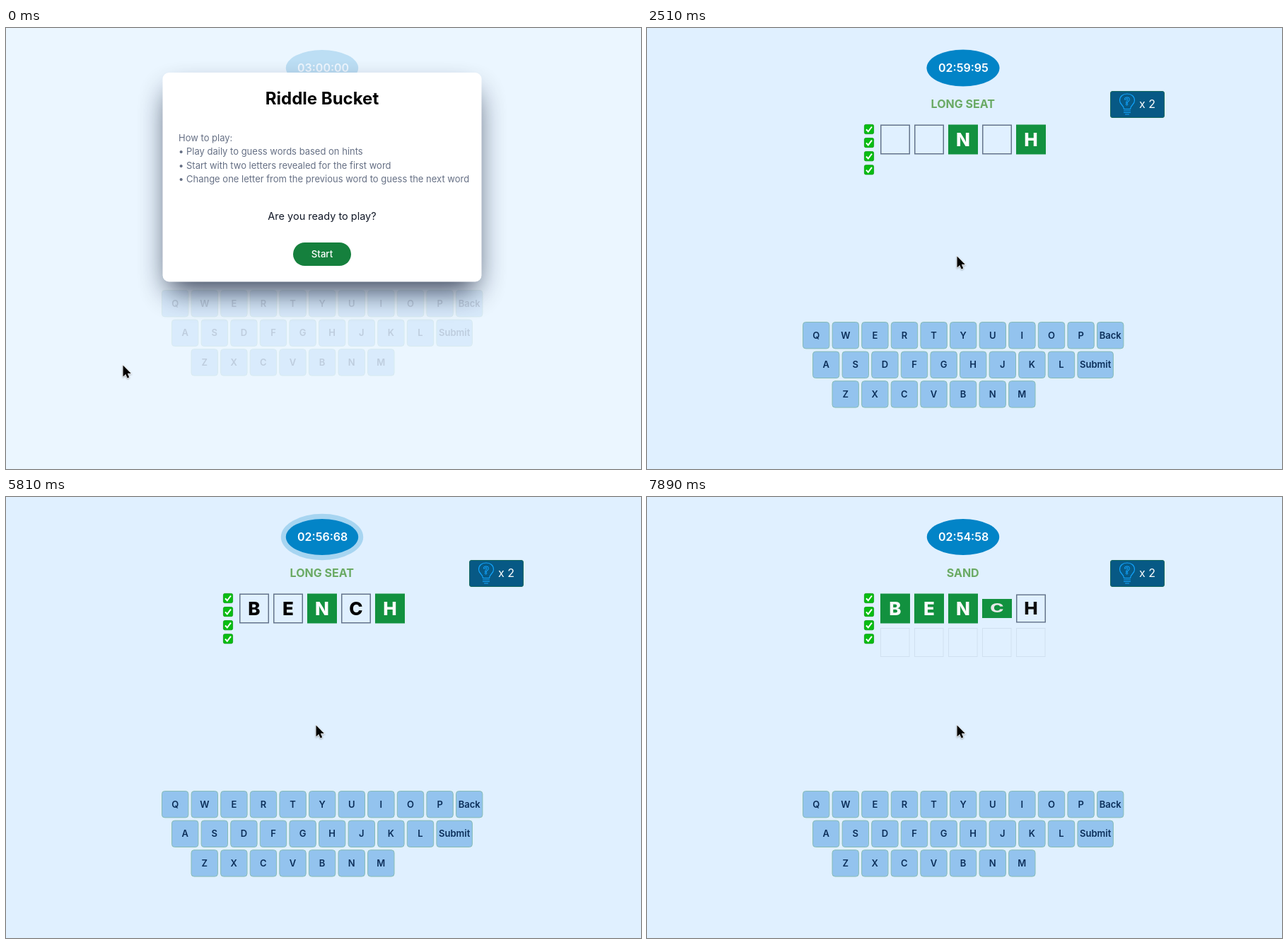
Write an HTML page that moves like this. It is 898x623 px and loops after 8000 ms.

```html
<!DOCTYPE html>
<html lang="en">
<head>
<meta charset="utf-8">
<title>Word game</title>
<style>
  html, body { margin: 0; width: 100%; height: 100%; overflow: hidden; background: #e0f0ff; }
  svg { display: block; width: 898px; height: 623px; font-family: Inter, sans-serif; }
  .mid { text-anchor: middle; }
  .key rect { fill: #93c3ee; stroke: #86bcb4; }
  .key text { font-size: 13px; font-weight: 600; fill: #0b2e59; }
  .tile text { font-size: 26px; font-weight: 800; }
  #clue { font-size: 16px; font-weight: 700; fill: #6aaa64; }
  #clock { font-size: 16px; font-weight: 600; fill: #fff; }
  #shadow { fill: rgb(8, 18, 45); opacity: .8; filter: blur(20px); }
  #title { font-size: 24px; font-weight: 700; }
  .rules { font-size: 13px; fill: #667085; }
  .bulb { fill: none; stroke: #12a3fb; stroke-width: 1.2; stroke-linecap: round; }
</style>
</head>
<body>
<svg viewBox="0 0 898 623">
  <rect id="page" width="898" height="623"/>

  <g id="shared">
    <ellipse id="halo" cx="447" cy="56.5" fill="#0284c7"/>
    <ellipse cx="447" cy="56.5" rx="51.2" ry="25.5" fill="#0284c7"/>
    <text id="clock" x="412" y="62"></text>
    <g id="keys"></g>
  </g>

  <g id="game">
    <text id="clue" class="mid" x="446.7" y="113"></text>
    <g id="checks"></g>
    <g id="tiles"></g>
    <g id="nextRow" fill="none" stroke="#64748b"></g>
    <rect x="655.5" y="89.5" width="76" height="37" rx="2.5" fill="#075985" stroke="#17695f"/>
    <g class="bulb">
      <path d="M674.5 114.500C674.500 109 668.500 108.500 668.500 102.500C668.500 96.500 673 93 679 93S689.500 96.500 689.500 102.500C689.500 108.500 683.500 109 683.500 114.500Z"/>
      <path d="M674.500 117H683.500M674.500 119.500H683.500M676.500 122H681.500"/>
      <text class="mid" x="679" y="108.500" font-size="15" font-weight="700" stroke-width=".9">?</text>
    </g>
    <text x="696" y="113" font-size="16" fill="#fff">x 2</text>
  </g>

  <g id="lobby">
    <rect id="shadow" x="229.500" y="91" width="435" height="280" rx="10"/>
    <rect x="221.500" y="63" width="451" height="295.500" rx="9" fill="#fff"/>
    <text id="title" class="mid" x="447" y="108">Riddle Bucket</text>
    <g class="rules">
      <text x="244" y="160">How to play:</text>
      <text x="244" y="179.300">• Play daily to guess words based on hints</text>
      <text x="244" y="198.600">• Start with two letters revealed for the first word</text>
      <text x="244" y="218">• Change one letter from the previous word to guess the next word</text>
    </g>
    <text class="mid" x="447" y="271" font-size="14.500" fill="#111827">Are you ready to play?</text>
    <rect id="start" x="406" y="303" width="82" height="33" rx="16.500"/>
    <text class="mid" x="447" y="324.300" font-size="13.200" font-weight="500" fill="#fff">Start</text>
    <g id="ring" fill="none">
      <circle cx="440.500" cy="323" r="9.800" stroke="#fff" stroke-width="3" opacity=".8"/>
      <circle cx="440.500" cy="323" r="9.800" stroke="#222" stroke-width="1.300"/>
    </g>
  </g>

  <path id="cursor" d="M0 0V16L3.700 12.600L6.100 18L8.700 16.900L6.400 11.600H11.300Z"
    fill="#000" stroke="#fff" stroke-width="1.200" style="paint-order: stroke; filter: drop-shadow(0 1px 1px rgba(0,0,0,.35))"/>
</svg>

<script>
const LOOP = 8000, GAME_START = 2510;
const SUBMIT = 4185, STAGGER = 300, FLIP = 500;
const GREEN = '#12913f', SLATE = '#64748b';
const WORD = 'BENCH';
const TYPED_AT = [1970, 2420, 0, 2870, 0];   // 0 marks a revealed letter

const $ = id => document.getElementById(id);
const clamp = (v, lo = 0, hi = 1) => Math.min(hi, Math.max(lo, v));
const smooth = u => u * u * (3 - 2 * u);
const set = (el, attrs) => { for (const a in attrs) el.setAttribute(a, attrs[a]); };

function add(parent, tag, attrs, text) {
  const el = document.createElementNS('http://www.w3.org/2000/svg', tag);
  set(el, attrs);
  if (text) el.textContent = text;
  return parent.appendChild(el);
}

// The CSS "ease" curve: cubic-bezier(.25, .1, .25, 1)
function ease(x) {
  x = clamp(x);
  const curve = (a, b, s) => 3 * a * s * (1 - s) ** 2 + 3 * b * s * s * (1 - s) + s ** 3;
  let lo = 0, hi = 1;
  for (let i = 0; i < 24; i++) {
    const s = (lo + hi) / 2;
    if (curve(.25, .25, s) < x) lo = s; else hi = s;
  }
  return curve(.1, 1, lo);
}

function buildKeys() {
  const rows = [
    [220, [...'QWERTYUIOP', 'Back']],
    [234, [...'ASDFGHJKL', 'Submit']],
    [261.5, [...'ZXCVBNM']]
  ];
  rows.forEach(([left, labels], r) => labels.forEach((label, i) => {
    const x = left + i * 41.6, y = 415 + r * 41.6;
    const w = label === 'Submit' ? 51.5 : 38.4;
    const key = add($('keys'), 'g', { class: 'key' });
    add(key, 'rect', { x: x + .5, y: y + .5, width: w - 1, height: 37.4, rx: 4 });
    add(key, 'text', { class: 'mid', x: x + w / 2, y: y + 23.6 }, label);
  }));
}

function buildChecks() {
  for (let i = 0; i < 4; i++) {
    const g = add($('checks'), 'g', { transform: `translate(307 ${136 + i * 19.1})` });
    add(g, 'rect', { x: .4, y: .4, width: 13.2, height: 13.2, rx: 2, fill: '#08bd12', stroke: '#079a10', 'stroke-width': .8 });
    add(g, 'path', { d: 'M3 7.3L5.800 10.300L11 3.500', fill: 'none', stroke: '#fff', 'stroke-width': 2 });
  }
}

const tiles = [...WORD].map((letter, i) => {
  const g = add($('tiles'), 'g', { class: 'tile' });
  const box = add(g, 'rect', { x: -20.25, y: -20.25, width: 40.5, height: 40.5, 'stroke-width': 1.5 });
  const text = add(g, 'text', { class: 'mid', y: 9.3 }, letter);
  add($('nextRow'), 'rect', { x: 330.5 + i * 48, y: 185.5, width: 40.5, height: 40 });
  return { g, box, text, x: 351 + i * 48 };
});

function drawTile(tile, i, elapsed, fade) {
  const q = (elapsed - SUBMIT - i * STAGGER) / FLIP;
  let green = !TYPED_AT[i], shown = elapsed >= TYPED_AT[i];
  let turn = 0, border = 1, ink = green ? '#fff' : '#000';
  if (elapsed >= SUBMIT) {
    green = q > .5;
    if (q < 0) border = fade;
    else turn = q < .5 ? ease(q / .45) : 1 - ease((q - .55) / .45);
    const level = Math.round(250 * ease(q));
    ink = `rgb(${level},${level},${level})`;
  }
  set(tile.g, { transform: `translate(${tile.x} 157.5) scale(1 ${Math.max(.001, Math.cos(turn * Math.PI / 2))})` });
  set(tile.box, { fill: green ? GREEN : 'none', stroke: green ? GREEN : SLATE, 'stroke-opacity': border });
  set(tile.text, { fill: ink, visibility: shown ? 'inherit' : 'hidden' });
}

// The screen is refreshed about every 150 ms; the game clock lags a little at first.
function gameTime(t) {
  const k = Math.max(0, Math.floor((t - GAME_START) / 149.4));
  return k < 12 ? 50 + 147.5 * k : 20 + 150 * k;
}

function clockText(elapsed) {
  const cs = Math.floor((180000 - elapsed) / 10);
  return [cs / 6000, cs / 100 % 60, cs % 100]
    .map(n => String(Math.floor(n)).padStart(2, '0')).join(':');
}

function drawCursor(t) {
  const leg = (start, step, count) =>
    smooth(clamp(Math.floor((t - start) / step) + 1, 0, count) / count);
  const a = leg(590, 150, 4), b = leg(1330, 147.5, 5);
  const x = 165.5 + 192 * a + 81 * b, y = 476.5 - 113.500 * a - 40.500 * b;
  set($('cursor'), { transform: `translate(${x} ${y})` });
  set($('start'), { fill: b > .7 ? '#6aaa64' : '#15803d' });
}

function draw(t) {
  const playing = t >= GAME_START;
  const elapsed = playing ? gameTime(t) : 0;
  $('page').setAttribute('fill', playing ? '#e0f0ff' : '#ebf6ff');
  $('lobby').style.display = playing ? 'none' : '';
  $('game').style.display = playing ? '' : 'none';
  $('shared').setAttribute('opacity', playing ? 1 : .2);
  $('keys').setAttribute('transform', `translate(0 ${playing ? 0 : -45})`);
  $('ring').style.display = t >= 2370 ? '' : 'none';
  $('clock').textContent = clockText(elapsed);
  drawCursor(t);

  const pulse = ease(elapsed % 1500 / 750);
  set($('halo'), { rx: 51 + 10 * pulse, ry: 25.5 + 10 * pulse, opacity: playing ? .9 * (1 - pulse) : 0 });

  const fade = .12 * clamp((elapsed - SUBMIT) / 1235);
  $('clue').textContent = elapsed >= SUBMIT ? 'SAND' : 'LONG SEAT';
  $('nextRow').setAttribute('opacity', fade);
  tiles.forEach((tile, i) => drawTile(tile, i, elapsed, fade));
}

buildKeys();
buildChecks();
const origin = performance.now();
function tick() {
  draw((performance.now() - origin) % LOOP);
  requestAnimationFrame(tick);
}
tick();
</script>
</body>
</html>
```
